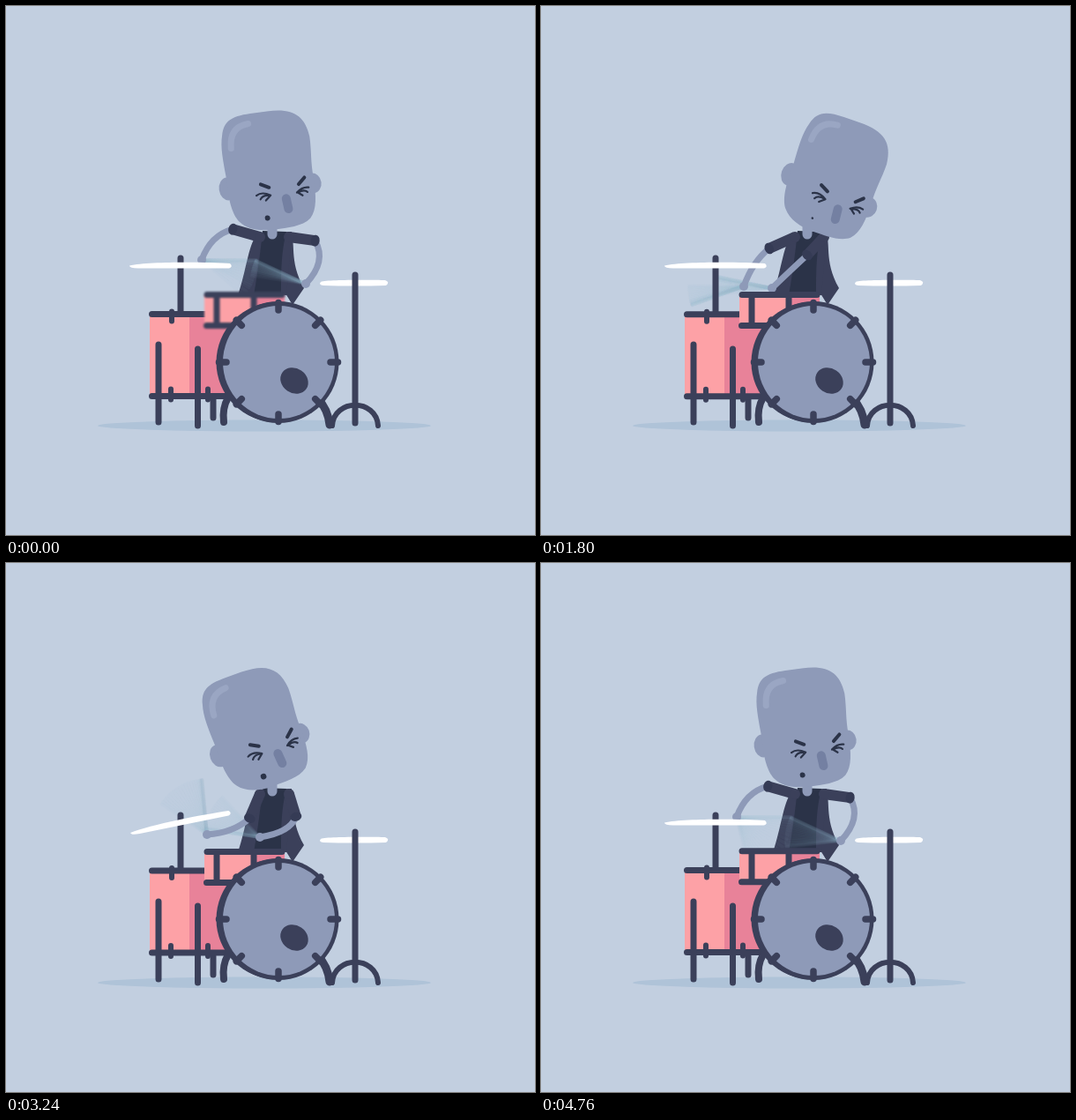
Recreate the animation shown at these times as an HTML page with a canvas. Size 600x600 px, loop 4800 ms.

```html
<!DOCTYPE html>
<html lang="en">
<head>
<meta charset="utf-8">
<title>Drummer</title>
<style>
  html, body { margin: 0; height: 100%; overflow: hidden; background: #c2cfe0; }
  canvas { display: block; }
</style>
</head>
<body>
<canvas id="stage" width="600" height="600"></canvas>
<script>
const ctx = document.getElementById('stage').getContext('2d');
const LOOP = 4800, STEP = 40, TAU = Math.PI * 2, DEG = Math.PI / 180;
const BG = '#c2cfe0', SKIN = '#8e9ab8', DARK = '#3b405a', INK = '#2b3348',
      PINK = '#fda1a6', ROSE = '#e88299', STICK = '#8ea8be';

// body: head angle, drop, mouth radius, calmness, snare shake, tom shake, stick visibility
// arms: sleeve angle, sleeve length, bend x, y, hand x, y, stick angle range
const SNARE = {
  body: [-8, 0, 3, 0, 1, .6, 1],
  left: [196, 32, 232, 260, 222, 288, 0, 80],
  right: [8, 30, 364, 290, 340, 315, 172, 205]
};
const TOM = {
  body: [18.8, 0, 1.3, 0, 0, 1, 1],
  left: [156, 32, 240, 290, 230, 318, 160, 190],
  right: [133, 28, 285, 298, 262, 320, 165, 192]
};
const CRASH = {
  body: [-19.5, 0, 3.3, 0, 0, 0, 1],
  left: [113, 30, 258, 306, 228, 308, 207, 265],
  right: [73, 27, 322, 306, 288, 311, 188, 232]
};
const REST = {
  body: [0, 13, 3, 1, 0, 0, 0],
  left: [100, 39, 278, 320, 276, 332, 0, 80],
  right: [80, 35, 331, 324, 333, 340, 172, 205]
};

const mix = (a, b, p) => a.map((v, i) => v + (b[i] - v) * p);

// Underdamped step response
function spring(u) {
  if (u < 0) return 0;
  if (u > 640) return 1;
  return 1 - Math.exp(-.0084 * u) * (Math.cos(.0112 * u) + .75 * Math.sin(.0112 * u));
}

function easeOut(u) {
  return 1 - (1 - Math.min(1, u / 200)) ** 3;
}

// The right arm may follow the rest of the body with a lag
function blend(a, b, ease, u, lag) {
  const p = ease(u);
  return {
    body: mix(a.body, b.body, p),
    left: mix(a.left, b.left, p),
    right: mix(a.right, b.right, ease(u - lag))
  };
}

function poseAt(t) {
  if (t < 1040) return SNARE;
  if (t < 2140) return blend(SNARE, TOM, spring, t - 1040, 40);
  if (t < 3280) return blend(TOM, CRASH, spring, t - 2140, 40);
  if (t < 4560) return blend(CRASH, REST, spring, t - 3280, 0);
  return blend(REST, SNARE, easeOut, t - 4560, 0);
}

function fill(d, color) {
  ctx.fillStyle = color;
  ctx.fill(new Path2D(d));
}

function stroke(d, color, width) {
  ctx.strokeStyle = color;
  ctx.lineWidth = width;
  ctx.stroke(new Path2D(d));
}

function oval(x, y, rx, ry, color, turn = 0) {
  ctx.fillStyle = color;
  ctx.beginPath();
  ctx.ellipse(x, y, rx, ry, turn, 0, TAU);
  ctx.fill();
}

function at(x, y, angle, draw) {
  ctx.save();
  ctx.translate(x, y);
  ctx.rotate(angle * DEG);
  draw();
  ctx.restore();
}

// Motion-blurred stick swinging around the hand
function stick([, , , , x, y, lo, hi], t, phase, visible) {
  if (visible < .02) return;
  ctx.globalAlpha = .05 * Math.min(1, visible);
  for (let i = 0; i < 24; i++) {
    const swing = .5 + .5 * Math.sin(TAU * (t - i * 2.5) / 128 + phase);
    at(x, y, lo + (hi - lo) * swing, () => stroke('M0 0H62', STICK, 4));
  }
  ctx.globalAlpha = 1;
}

function arm([angle, length, bx, by, hx, hy], x, y) {
  const ex = x + length * Math.cos(angle * DEG), ey = y + length * Math.sin(angle * DEG);
  stroke(`M${ex} ${ey}Q${bx} ${by} ${hx} ${hy}`, SKIN, 7);
  oval(hx, hy, 5, 5, SKIN);
  ctx.lineCap = 'butt';
  stroke(`M${x} ${y}L${ex} ${ey}`, DARK, 12);
  ctx.lineCap = 'round';
  oval(x, y, 6, 6, DARK);
  oval(ex, ey, 5, 6.5, '#353b55', angle * DEG);
}

function torso(drop) {
  at(0, drop, 0, () => {
    fill('M322 256C330 268 320 288 338 320L325 339L312 318Z', DARK);
    fill('M287 257C275 266 273 300 263 328H318L324 256Z', DARK);
    fill('M291 255L318 256C312 280 312 300 312 328H281C286 300 289 275 291 255Z', INK);
    stroke('M302 248V259', SKIN, 11);
  });
}

function brow(x, y, angle) {
  at(x, y, angle, () => stroke('M-5 0H5', INK, 4));
}

function face(calm, mouth) {
  brow(2 * calm, -54.5 - 10 * calm, 28 - 50 * calm);
  brow(42 + calm, -54.5 - 9.5 * calm, -42 + 72 * calm);
  if (calm > .5) {
    stroke('M-7 -42Q3 -57 14 -42ZM32 -42Q41 -54 49 -42Z', INK, 1.8);
    fill('M-1 -42H8Q7 -37 3 -37T-1 -42ZM37 -42H46Q45 -38 41.5 -38T37 -42Z', INK);
    stroke('M0 -21Q5 -12 17 -17', INK, 1.8);
  } else {
    stroke('M-11 -45Q-4 -49 5 -43M-7 -40Q-4 -45 4 -43M-1 -38L5 -43' +
      'M49 -46Q42 -48 35 -42M47 -41Q44 -45 36 -42M41 -38L36 -42', INK, 2.2);
    oval(-2, -18, mouth, mouth, INK);
  }
}

function head([angle, drop, mouth, calm]) {
  at(302, 264 + drop * .77, angle, () => {
    ctx.translate(0, -6);
    oval(-42, -57, 10, 13, SKIN);
    oval(54, -50, 10, 11.5, SKIN);
    fill('M-42 -68C-43 -90-44 -105-40 -118C-36 -133-28 -138-5 -138H14C43 -138 56 -128 58 -103' +
      'C58 -85 55 -75 56 -55C56 -35 55 -20 46 -11C36 -3 18 -4 5 -4C-12 -4-26 -8-34 -18' +
      'C-42 -28-43 -48-42 -68Z', SKIN);
    stroke('M-32 -102Q-31 -126-9 -127', '#9aa6c3', 7);
    stroke('M22 -37L23 -25', '#7480a2', 10);
    face(calm, mouth);
  });
}

function cymbalTilt(t) {
  if (t < 2280 || t > 4080) return 0;
  const decay = t < 3360 ? 1 : Math.exp((3360 - t) / 150);
  return -11.5 * decay * Math.cos(TAU * (t - 2640) / 200);
}

function crash(t) {
  stroke('M198 286V348', DARK, 7);
  at(198, 294.5, cymbalTilt(t), () =>
    fill('M-58 0C-35 -5 30 -4 56 -2.5Q60 1 55 3H-48Q-58 3-58 0Z', '#fff'));
}

function hihat() {
  fill('M357 313C365 310 420 311 430 311Q436 313 431 317Q395 318 360 317Q354 316 357 313Z', '#fff');
  stroke('M370 476C372 445 420 445 422 476', DARK, 6);
  stroke('M396 305V473', DARK, 7);
}

// Trembles a drum, blurred most where it moves fastest
function shake(amp, t, phase, draw) {
  const a = TAU * t / 120 + phase, blur = amp * Math.abs(Math.cos(a));
  ctx.filter = blur > .2 ? `blur(${blur}px)` : 'none';
  at(0, amp * Math.sin(a), 0, draw);
  ctx.filter = 'none';
}

function floorTom() {
  fill('M163 350H209V442H163Z', PINK);
  fill('M208 350H255V442H208Z', ROSE);
  stroke('M165.5 349H232M165.5 442H255', DARK, 7);
  stroke('M188 346V357M187 434V446M229 434V446', DARK, 6);
}

function snare() {
  fill('M225 328H282V363H225Z', PINK);
  fill('M281 328H316V363H281Z', ROSE);
  stroke('M228 327.5H313M227.5 362.5H264M239 330V360M281 330V345', DARK, 7);
}

function kick() {
  stroke('M252 444Q245 456 247 472', DARK, 8);
  stroke('M354 446Q365 457 367 475', DARK, 9);
  oval(306.5, 404, 68, 68, DARK);
  oval(309, 404, 68.5, 69, DARK);
  oval(309.5, 404, 63.5, 64, SKIN);
  oval(327, 425, 16.5, 14, DARK, .6);
  for (let i = 0; i < 8; i++) at(309, 404, i * 45, () => stroke('M59 0H67.5', DARK, 7.5));
}

function draw(t) {
  const { body, left, right } = poseAt(t);
  const [, drop, , , snareShake, tomShake, visible] = body;
  ctx.lineCap = ctx.lineJoin = 'round';
  ctx.fillStyle = BG;
  ctx.fillRect(0, 0, 600, 600);
  oval(293, 476, 189, 6.5, '#afc3d8');

  torso(drop);
  stick(left, t, 0, visible);
  stick(right, t, Math.PI, visible);
  arm(left, 288, 262 + drop);
  arm(right, 321, 262 + drop);
  head(body);

  crash(t);
  stroke('M235 446V467', DARK, 7);
  shake(tomShake, t, 1, floorTom);
  stroke('M173 384V472M217.5 389V476', DARK, 7);
  shake(snareShake, t, 0, snare);
  hihat();
  kick();
}

function tick() {
  const t = performance.now() % LOOP;
  draw(Math.floor(t / STEP) * STEP);
  requestAnimationFrame(tick);
}
tick();
</script>
</body>
</html>
```
